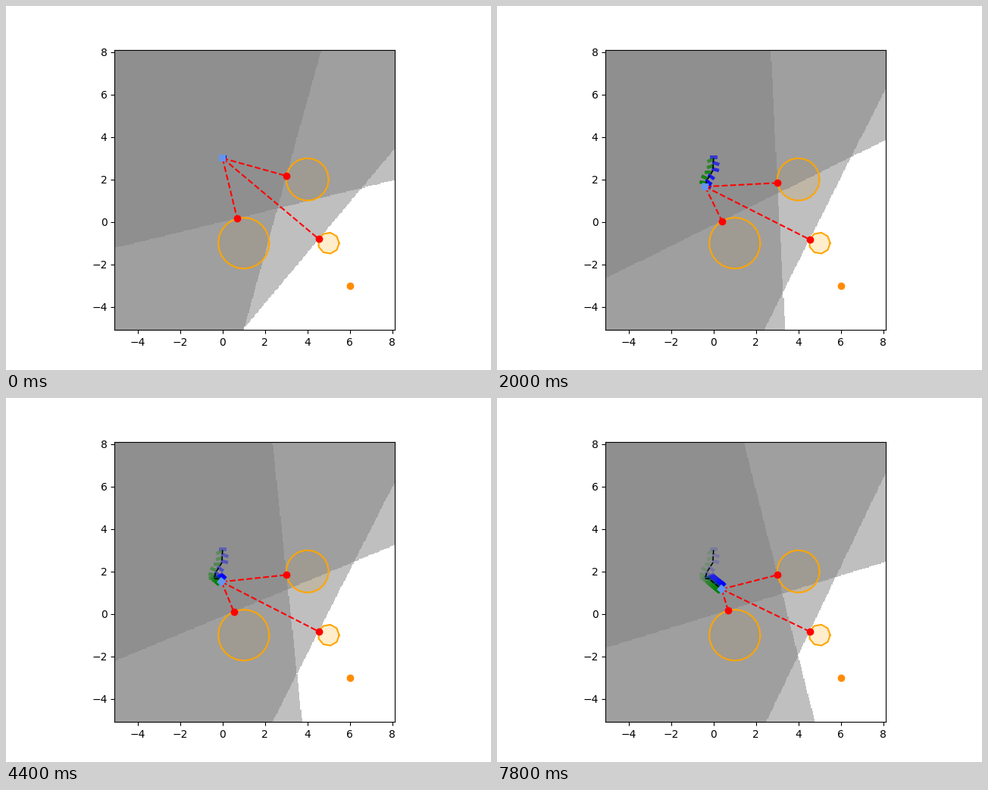
Animation of 640 by 480 pixels, one loop 8 s. Source, as a matplotlib script:

```python
import numpy as np
import matplotlib.pyplot as plt
from matplotlib.animation import FuncAnimation
from matplotlib.patches import Rectangle

STEPS = 40
LO, HI = -5.09, 8.11
CELLS = 300
FADE = 0.95

# x, y, radius, polygon sides
OBSTACLES = [(1, -1, 1.2, 24), (4, 2, 1.0, 19), (5, -1, 0.5, 9)]
GOAL = (6, -3)

# step, x, y, heading in degrees: walk down, turn, then head for the goal
PATH = np.array([(0, 0, 3, 0), (4, -.03, 2.41, 0), (7, -.31, 1.97, -35),
                 (10, -.4, 1.66, -10), (14, -.22, 1.66, 40),
                 (22, -.05, 1.51, 48), (39, .38, 1.165, 50)]).T


def body_at(k):
    return np.array([np.interp(k, PATH[0], col) for col in PATH[1:]])


def foot_at(k):
    """Left foot on even steps, right foot on odd ones, splayed at first."""
    x, y, angle = body_at(k)
    side = (1 if k % 2 == 0 else -1) * min(k, 1)
    a = np.radians(angle)
    splay = 25 * side * np.exp(-k / 8)
    return (x + 0.12 * side * np.cos(a),
            y + 0.12 * side * np.sin(a) + 0.05, angle - splay)


def polygon(x, y, r, n):
    a = np.linspace(0, 2 * np.pi, n + 1)
    return np.column_stack([x + r * np.cos(a), y + r * np.sin(a)])


def nearest(poly, p):
    best, best_d = None, np.inf
    for a, b in zip(poly[:-1], poly[1:]):
        e = b - a
        t = np.clip((p - a) @ e / (e @ e), 0, 1)
        d = np.hypot(*(p - a - t * e))
        if d < best_d - 1e-9:
            # on a vertical edge, hold its first corner
            inside = abs(e[0]) < 1e-9 and t < 1
            best, best_d = (a if inside else a + t * e), d
    return best


def box(w, h, color, z):
    return ax.add_patch(Rectangle((0, 0), w, h, rotation_point="center",
                                  color=color, lw=0, zorder=z))


def place(rect, x, y, angle):
    rect.set_xy((x - rect.get_width() / 2, y - rect.get_height() / 2))
    rect.set_angle(angle)


fig = plt.figure(figsize=(6.4, 4.8), dpi=100)
ax = fig.add_subplot()

polys = [polygon(*o) for o in OBSTACLES]
for poly in polys:
    ax.fill(*poly.T, color="orange", alpha=0.2, lw=0, zorder=1)
    ax.plot(*poly.T, color="orange", lw=1.5, zorder=2)
ax.plot(*GOAL, "o", color="darkorange", zorder=2)

half = (HI - LO) / CELLS / 2
axis = np.linspace(LO + half, HI - half, CELLS)
gx, gy = np.meshgrid(axis, axis)
shade = np.full((CELLS, CELLS, 4), 0.5)
image = ax.imshow(shade, extent=(LO, HI, LO, HI), origin="lower",
                  interpolation="nearest", zorder=1.5)

body = np.array([body_at(k) for k in range(STEPS)])
feet = []
for k in range(STEPS):
    foot = box(0.35, 0.16, "green" if k % 2 else "blue", 3)
    place(foot, *foot_at(k))
    feet.append(foot)

trail, = ax.plot([], [], "k--", lw=1.1, zorder=4)
rays = [ax.plot([], [], "r--", lw=1.5, zorder=5)[0] for _ in polys]
dots = [ax.plot([], [], "ro", zorder=6)[0] for _ in polys]
robot = box(0.32, 0.32, "cornflowerblue", 7)

ax.set_xlim(LO, HI)
ax.set_ylim(LO, HI)
ax.set_aspect("equal")


def draw(k):
    p = body[k, :2]
    count = np.zeros_like(gx)
    for poly, ray, dot in zip(polys, rays, dots):
        c = nearest(poly, p)
        n = p - c
        count += (gx - c[0]) * n[0] + (gy - c[1]) * n[1] >= 0
        ray.set_data([p[0], c[0]], [p[1], c[1]])
        dot.set_data([c[0]], [c[1]])
    shade[..., 3] = 1 - 0.5 ** count
    image.set_data(shade)
    for j, foot in enumerate(feet):
        foot.set_visible(j <= k)
        foot.set_alpha(FADE ** max(k - j, 0))
    trail.set_data(body[:k + 1, 0], body[:k + 1, 1])
    place(robot, *body[k])
    return [image, trail, robot, *rays, *dots, *feet]


anim = FuncAnimation(fig, draw, frames=STEPS, interval=200,
                     repeat=True, repeat_delay=0)
plt.show()
```
